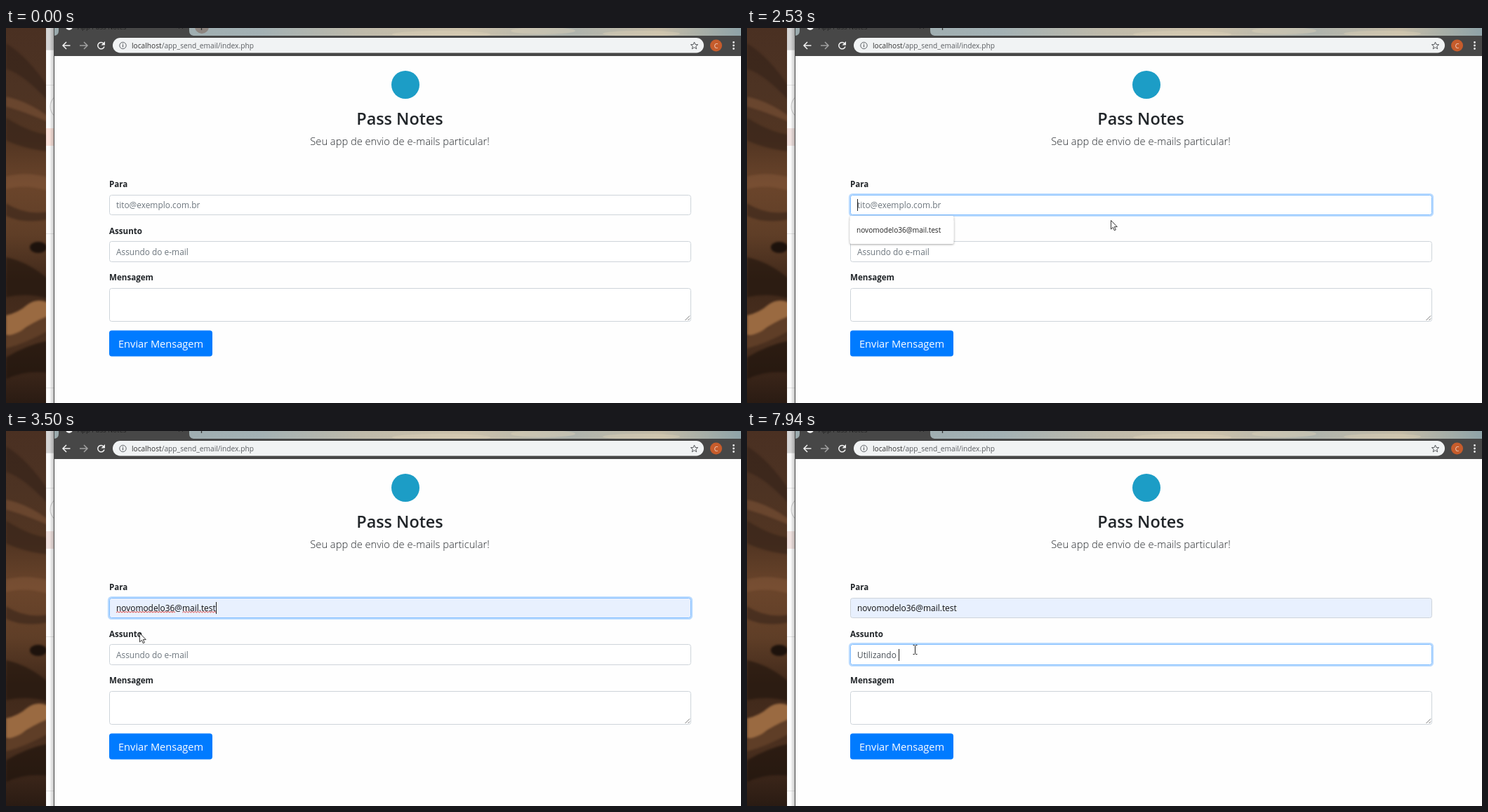
These frames come from a looping animation (1047 by 535 pixels, 8000 ms). An HTML page:

```html
<!DOCTYPE html>
<html lang="pt-BR">
<head>
<meta charset="utf-8">
<title>App</title>
<style>
  html, body { margin: 0; width: 100%; height: 100%; overflow: hidden; background: #fefefe; }
  svg { display: block; width: 1047px; height: 535px; }
  text { font-family: "Open Sans", "Noto Sans", sans-serif; font-size: 11.9px; white-space: pre; }
  .label { font-weight: 700; font-size: 11.6px; fill: #212529; }
  .field { fill: #fff; stroke: #ced4da; }
  .ring { fill: none; stroke: #007bff; stroke-width: 2.6; }
  .caret { stroke: #222; }
  .icon { fill: none; stroke: #f1f1f1; stroke-width: 1.5; }
  #popup { filter: drop-shadow(0 1px 1.5px rgba(0, 0, 0, .35)); }
  #rocks { filter: blur(1.5px); }
</style>
</head>
<body>
<svg viewBox="0 0 1047 535">
  <defs>
    <linearGradient id="rock" x2="0" y2="1">
      <stop offset="0" stop-color="#4a3022"/>
      <stop offset=".16" stop-color="#4d3323"/>
      <stop offset=".3" stop-color="#523522"/>
      <stop offset=".42" stop-color="#6b452b"/>
      <stop offset=".55" stop-color="#5f3e27"/>
      <stop offset=".68" stop-color="#3f281a"/>
      <stop offset=".84" stop-color="#4b301f"/>
      <stop offset="1" stop-color="#2a1b13"/>
    </linearGradient>
    <linearGradient id="sky">
      <stop offset="0" stop-color="#9aa9ac"/>
      <stop offset=".3" stop-color="#a3b1b4"/>
      <stop offset=".45" stop-color="#bfbaaa"/>
      <stop offset=".6" stop-color="#cdc2ab"/>
      <stop offset=".75" stop-color="#aeb3ad"/>
      <stop offset=".88" stop-color="#c5bca7"/>
      <stop offset="1" stop-color="#8fa3a8"/>
    </linearGradient>
    <linearGradient id="shade">
      <stop offset="0" stop-color="#000" stop-opacity="0"/>
      <stop offset="1" stop-color="#000" stop-opacity=".25"/>
    </linearGradient>
  </defs>

  <!-- wallpaper -->
  <path fill="url(#rock)" d="M0 0H57V535H0z"/>
  <g id="rocks">
    <path fill="#2f1e17" opacity=".5" d="M0 22Q30 40 60 84V104Q25 66 0 58zM0 128Q35 150 60 152V176Q24 172 0 160zM0 250Q28 268 60 262V273Q25 280 0 268z"/>
    <path fill="#83583a" opacity=".5" d="M0 98Q30 104 60 126V134Q22 118 0 112zM0 212Q28 204 60 213V232Q25 222 0 230z"/>
    <path fill="#23160f" opacity=".65" d="M0 327Q32 334 60 358V386Q30 377 0 384z"/>
    <ellipse cx="46" cy="313" rx="12" ry="8" fill="#1d120c"/>
    <path fill="#9a6a41" d="M0 410Q18 406 30 395Q45 384 60 392V411Q36 421 22 432Q10 440 0 438z"/>
    <path fill="#5f3e27" d="M0 440Q24 434 38 422L60 411V432Q28 450 0 457z"/>
    <path fill="#20140e" opacity=".7" d="M0 470Q30 452 60 446V492Q26 488 0 501z"/>
  </g>

  <!-- window behind -->
  <path fill="#fcfcfc" d="M57 0H69V535H57z"/>
  <path fill="#d5d5d5" d="M57 0H69V31H57z"/>
  <path stroke="#e4e4e4" d="M57 31.5H69M57 81.5H69M57 293.5H69M57 513.5H69"/>
  <circle cx="81" cy="112" r="18" fill="#fff" stroke="#c8c8c8"/>
  <path id="strip" d="M57 143H69V168H57z"/>
  <path fill="url(#shade)" d="M62 0H69V535H62z"/>

  <!-- browser -->
  <path fill="#fefefe" d="M69 39H1047V535H69z"/>
  <path fill="url(#sky)" d="M69 0H1047V11H69z"/>
  <g fill="#e0d4ba" opacity=".4">
    <ellipse cx="620" cy="9" rx="70" ry="5"/>
    <ellipse cx="765" cy="4" rx="46" ry="5"/>
    <ellipse cx="905" cy="8" rx="55" ry="4"/>
  </g>
  <path fill="#474747" d="M69 11Q75 10 75 4V0H261V4Q261 10 267 11H1047V40H69z"/>
  <path stroke="#444" d="M68.5 0V535"/>
  <circle cx="90" cy="-2" r="5" fill="#eee"/>
  <text x="102" y="2" style="font-size:9.6px" fill="#202020">App Pass Notes</text>
  <path stroke="#222" d="M246-5l6 6M252-5l-6 6"/>
  <circle id="tabHover" cx="279" cy="-2" r="10" fill="#8d8580"/>
  <path stroke="#333" stroke-width="1.3" d="M274-1h9M278.5-5v8"/>
  <path class="icon" d="M91.5 25H81M86 20l-5 5 5 5"/>
  <path class="icon" style="stroke:#a0a0a0" d="M105 25h10.5M111 20l5 5-5 5"/>
  <path class="icon" d="M139 22A4.7 4.7 0 1 0 140 26.5"/>
  <path fill="#f1f1f1" d="M141 19V24.5H135.5z"/>
  <rect x="152" y="14" width="842" height="21.5" rx="10.75" fill="#f1f3f4"/>
  <circle cx="166.500" cy="25" r="4.7" fill="none" stroke="#5f6368"/>
  <path stroke="#5f6368" stroke-width="1.2" d="M166.5 24v3.5M166.5 22v1.2"/>
  <text x="179" y="28.5" style="font-size:10.2px" fill="#333">localhost<tspan fill="#5a5d61">/app_send_email/index.php</tspan></text>
  <path fill="none" stroke="#55585c" d="M980.5 20l1.4 3.5 3.7.2-2.9 2.4 1 3.7-3.200-2.100-3.200 2.100 1-3.700-2.900-2.400 3.700-.2z"/>
  <circle cx="1011.5" cy="25" r="8.5" fill="#c65c2c"/>
  <text x="1011.5" y="28.5" text-anchor="middle" style="font-size:9px" fill="#f6ddd0">C</text>
  <path stroke="#f1f1f1" stroke-width="2.8" stroke-linecap="round" stroke-dasharray="0 4.5" d="M1036.5 20.5v9.1"/>

  <!-- page -->
  <circle cx="569" cy="81" r="20" fill="#1c9dc6"/>
  <text x="561" y="138" text-anchor="middle" style="font-size:23.4px;font-weight:600" fill="#212529">Pass Notes</text>
  <text x="561" y="167" text-anchor="middle" style="font-size:14.7px;font-weight:300" fill="#212529">Seu app de envio de e-mails particular!</text>

  <text class="label" x="147" y="227">Para</text>
  <rect id="ringTo" class="ring" x="146.2" y="237.2" width="830.6" height="30.6" rx="4"/>
  <rect id="fieldTo" class="field" x="147.5" y="238.5" width="828" height="28" rx="3"/>
  <text id="to" x="157" y="257"></text>
  <path id="squiggle" fill="none" stroke="#e0302a" stroke-width=".9"/>
  <path id="caretTo" class="caret"/>

  <text class="label" x="147" y="293.5">Assunto</text>
  <rect id="ringSubject" class="ring" x="146.2" y="303.2" width="830.6" height="31.6" rx="4"/>
  <rect id="fieldSubject" class="field" x="147.5" y="304.5" width="828" height="29" rx="3"/>
  <text id="subject" x="157" y="323.5"></text>
  <path id="caretSubject" class="caret"/>

  <text class="label" x="147" y="360">Mensagem</text>
  <rect class="field" x="147.5" y="371.5" width="828" height="47" rx="3"/>
  <path stroke="#777" d="M967.5 417l6.5-6.5M971.5 417l2.5-2.5"/>
  <rect x="147" y="431.5" width="147" height="37" rx="3.7" fill="#007bff"/>
  <text x="160" y="456" style="font-size:14.6px" fill="#fff">Enviar Mensagem</text>

  <g id="popup">
    <rect x="146.5" y="268" width="148" height="40" rx="2" fill="#fff"/>
    <path id="item" d="M146.5 275h148v27h-148z"/>
    <text id="offer" x="156" y="292" style="font-size:10.1px" fill="#222"></text>
  </g>

  <g id="pointer">
    <path id="arrow" fill="#fff" stroke="#222" stroke-width=".9" d="M.5.5V13l2.9-2.7 1.9 4.5 2-.9-1.9-4.3H9.3z"/>
    <path id="beam" fill="none" stroke="#222" d="M-3-6.5h2l1 1 1-1h2M0-5.5v11M-3 6.5h2l1-1 1 1h2"/>
  </g>
</svg>
<script>
const LOOP = 8000;
const ADDRESS = "novomodelo36@mail.test";
const TYPED = "Utilizando ";
const KEYS = [5250, 5560, 5710, 5940, 6200, 7120, 7330, 7450, 7560, 7680, 7940];
// Moments of the interaction
const ACTIVATE = 1340, FOCUS_TO = 1440, PREVIEW = 2660, PICK = 3130, FOCUS_SUBJECT = 4090;
const FADE = 130;
// Pointer stops: time, x, y
const STOPS = [
  [90, 946, 530], [590, 819, 254], [930, 819, 254], [1000, 823, 260],
  [1150, 823, 260], [1180, 823, 261], [1340, 823, 261], [1500, 825, 262],
  [1840, 825, 262], [1970, 831, 280], [2440, 831, 280], [2630, 163, 267],
  [2660, 165, 277], [2860, 165, 277], [3130, 176, 284], [3500, 190, 288],
  [3630, 190, 290], [3680, 190, 290], [4050, 239, 312]
];

const $ = id => document.getElementById(id);
const clamp = v => Math.max(0, Math.min(1, v));
const fade = since => clamp(since / FADE);
const show = (id, on) => { $(id).style.display = on ? "" : "none"; };
const blink = since => since >= 0 && since % 1000 < 500;

function pointerAt(t) {
  const i = STOPS.findIndex(s => s[0] > t);
  if (i < 1) return STOPS.at(i).slice(1);
  const [t0, x0, y0] = STOPS[i - 1], [t1, x1, y1] = STOPS[i];
  const p = (t - t0) / (t1 - t0), e = p * p * (3 - 2 * p);
  return [x0 + (x1 - x0) * e, y0 + (y1 - y0) * e];
}

function wave(from, to) {
  let d = `M${from} 259`;
  for (let x = from, up = true; x < to; x += 2, up = !up) d += `l2 ${up ? -1.5 : 1.5}`;
  return d;
}

function setText(id, text, color) {
  const el = $(id);
  if (el.textContent !== text) el.textContent = text;
  el.style.fill = color;
  return el;
}

function setCaret(id, on, x, top) {
  show(id, on);
  $(id).setAttribute("d", `M${Math.round(x) + .5} ${top}v17`);
}

function setFocus(name, amount) {
  $("ring" + name).style.opacity = amount * .27;
  $("field" + name).style.stroke = `color-mix(in srgb, #80bdff ${amount * 100}%, #ced4da)`;
}

function drawTo(t) {
  const filled = t >= PREVIEW, picked = t >= PICK && t < FOCUS_SUBJECT;
  const text = setText("to", filled ? ADDRESS : "tito@exemplo.com.br", filled ? "#111" : "#6c757d");
  const end = 157 + text.getComputedTextLength();
  setFocus("To", fade(t - FOCUS_TO) - fade(t - FOCUS_SUBJECT));
  $("fieldTo").style.fill = filled ? "#e8f0fe" : "#fff";
  show("squiggle", picked);
  if (picked) {
    const at = 157 + text.getSubStringLength(0, ADDRESS.indexOf("@"));
    $("squiggle").setAttribute("d", wave(157, at) + wave(at + 11, end));
  }
  if (filled) setCaret("caretTo", picked && blink(t - PICK), end, 244);
  else setCaret("caretTo", blink(t - FOCUS_TO), 157, 244);
}

function drawSubject(t) {
  const count = KEYS.filter(k => k <= t).length;
  const text = setText("subject", count ? TYPED.slice(0, count) : "Assundo do e-mail", count ? "#495057" : "#6c757d");
  const since = t - (count ? KEYS[count - 1] : FOCUS_SUBJECT);
  const x = 157 + (count ? text.getComputedTextLength() : 0);
  setFocus("Subject", fade(t - FOCUS_SUBJECT));
  setCaret("caretSubject", blink(since), x, 311);
}

function drawPointer(t) {
  const [x, y] = pointerAt(t).map(Math.round);
  const inField = x > 147 && x < 976 && [[238, 266], [304, 333], [371, 418]].some(([a, b]) => y >= a && y <= b);
  show("pointer", t >= STOPS[0][0]);
  show("arrow", !inField);
  show("beam", inField);
  $("pointer").setAttribute("transform", `translate(${x + (inField ? .5 : 0)} ${y})`);
}

function frame(now) {
  const t = now % LOOP;
  drawTo(t);
  drawSubject(t);
  show("popup", t >= FOCUS_TO && t < PICK);
  $("item").style.fill = t >= PREVIEW ? "#eee" : "#fff";
  show("tabHover", t < ACTIVATE);
  $("strip").style.fill = t < ACTIVATE ? "#fbe3dc" : "#f1e3e1";
  drawPointer(t);
  requestAnimationFrame(frame);
}

$("offer").textContent = ADDRESS;
requestAnimationFrame(frame);
</script>
</body>
</html>
```
